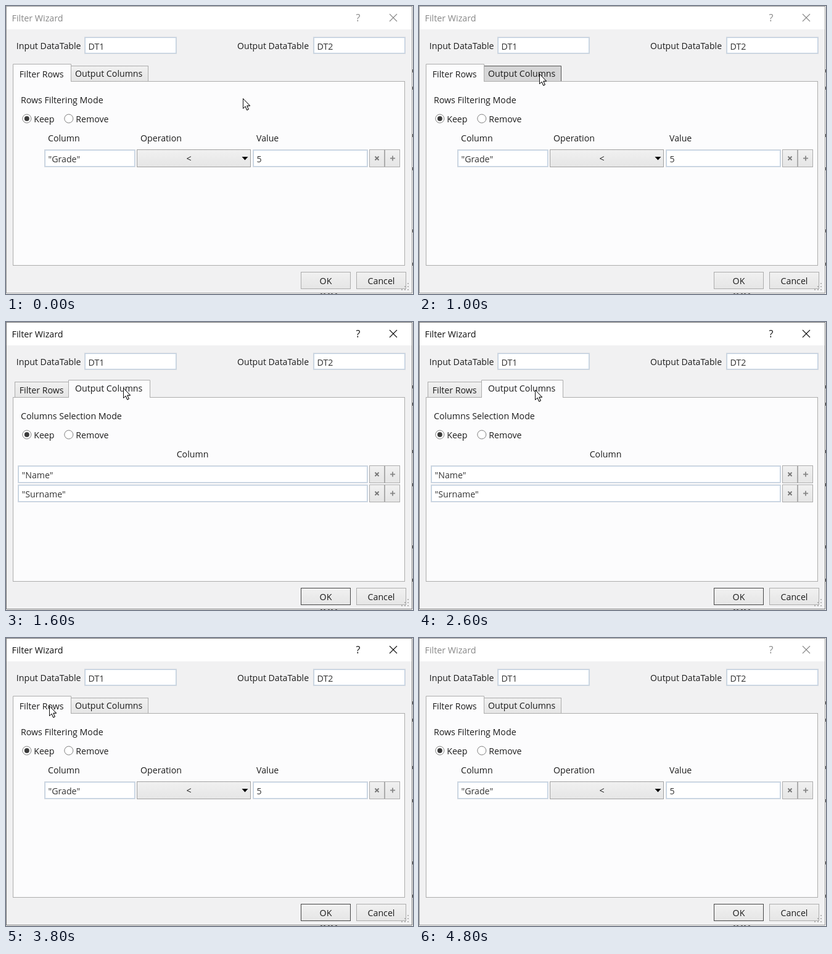
Write an HTML page with a canvas that moves like this. It is 660 by 468 pixels and loops after 5 s.

```html
<!DOCTYPE html>
<html lang="en">
<head>
<meta charset="utf-8">
<title>Filter Wizard</title>
<style>
html, body { margin: 0; width: 660px; height: 468px; overflow: hidden; background: #fff; }
canvas { display: block; }
</style>
</head>
<body>
<canvas id="stage" width="660" height="468"></canvas>
<script>
const ctx = document.getElementById('stage').getContext('2d');
const LOOP = 5000;
const INK = '#1c1c1c', LINE = '#acacac', DARK = '#464646';

// Pointer track: start time, x, y; the pointer jumps between samples.
const track = [
  [0, 384, 150], [400, 333, 142], [600, 250, 135], [800, 208, 112],
  [1000, 195, 110], [1600, 190, 107], [2600, 188, 110], [2800, 134, 111],
  [3000, 78, 111], [3200, 70, 110], [4000, 75, 234], [4200, 66, 445]
];
const POINTER_GONE = 4400;

function fill(x, y, w, h, color) {
  ctx.fillStyle = color;
  ctx.fillRect(x, y, w, h);
}

function frame(x, y, w, h, color) {
  ctx.strokeStyle = color;
  ctx.lineWidth = 1;
  ctx.strokeRect(x + .5, y + .5, w - 1, h - 1);
}

function path(points, color, width = 1, close = false) {
  ctx.beginPath();
  points.forEach(([x, y], i) => i ? ctx.lineTo(x, y) : ctx.moveTo(x, y));
  if (close) ctx.closePath();
  ctx.strokeStyle = color;
  ctx.lineWidth = width;
  ctx.stroke();
}

function text(str, x, y, { color = INK, align = 'left', size = 14.2 } = {}) {
  ctx.font = `${size}px "Open Sans", "Noto Sans", sans-serif`;
  ctx.textAlign = align;
  ctx.fillStyle = color;
  ctx.fillText(str, x, y);
}

function raised(x, y, w, h, border = LINE) {
  const g = ctx.createLinearGradient(0, y, 0, y + h);
  g.addColorStop(0, '#f1f1f1');
  g.addColorStop(1, '#e5e5e5');
  fill(x, y, w, h, g);
  frame(x, y, w, h, border);
}

function field(x, y, w, h, str) {
  fill(x, y, w, h, '#fff');
  frame(x, y, w, h, '#d3d8df');
  frame(x + 1, y + 1, w - 2, h - 2, '#c3d3e4');
  text(str, x + 6.5, y + 20.5, { color: '#333' });
}

function radio(x, y, on, label) {
  ctx.beginPath();
  ctx.arc(x, y, 7, 0, Math.PI * 2);
  ctx.fillStyle = '#fff';
  ctx.fill();
  ctx.strokeStyle = '#808080';
  ctx.lineWidth = 1;
  ctx.stroke();
  if (on) {
    ctx.beginPath();
    ctx.arc(x, y, 4, 0, Math.PI * 2);
    ctx.fillStyle = '#3c3c3c';
    ctx.fill();
  }
  text(label, x + 11.4, 188.5);
}

function rowButtons(y) {
  raised(589, y, 25, 29);
  raised(614, y, 25, 29);
  const c = y + 14.5;
  path([[598.5, c - 3], [604.5, c + 3]], '#777', 1.8);
  path([[604.5, c - 3], [598.5, c + 3]], '#777', 1.8);
  path([[623, c], [631, c]], '#888', 1.8);
  path([[627, c - 4], [627, c + 4]], '#888', 1.8);
}

function openTab(x, w) {
  fill(x, 94, w, 29, '#fcfcfd');
  path([[x + .5, 123], [x + .5, 94.5], [x + w - .5, 94.5], [x + w - .5, 123]], LINE);
}

function closedTab(x, w, hot) {
  if (hot) {
    fill(x, 97, w, 25, '#d6d6d7');
    path([[x + .5, 122], [x + .5, 97.5], [x + w - .5, 97.5], [x + w - .5, 122]], '#555');
  } else {
    raised(x, 97, w, 26);
  }
}

function tabs(columns, hot) {
  if (columns) closedTab(14, 89, hot);
  else closedTab(105, 126, hot);
  fill(11, 122, 636, 300, '#fcfcfd');
  frame(11, 122, 636, 300, LINE);
  if (columns) openTab(101, 133);
  else openTab(11, 95);
  text('Filter Rows', 21.8, 115.5);
  text('Output Columns', 112, columns ? 112.5 : 115);
}

function rowsPage() {
  text('Rows Filtering Mode', 24, 158);
  text('Column', 68, 220);
  text('Operation', 218, 220);
  text('Value', 406, 220);
  field(62, 233, 148, 29, '"Grade"');
  raised(212, 233, 185, 29, '#a0a0a0');
  text('<', 296.5, 253, { align: 'center' });
  ctx.beginPath();
  ctx.moveTo(382.5, 245);
  ctx.lineTo(392.5, 245);
  ctx.lineTo(387.5, 250.5);
  ctx.fillStyle = '#000';
  ctx.fill();
  field(400, 233, 187, 29, '5');
  rowButtons(233);
}

function columnsPage() {
  text('Columns Selection Mode', 24, 158);
  text('Column', 302.5, 220, { align: 'center' });
  ['"Name"', '"Surname"'].forEach((str, i) => {
    field(19, 233 + 31 * i, 568, 29, str);
    rowButtons(233 + 31 * i);
  });
}

function backdrop() {
  fill(0, 0, 660, 468, '#fdfdfd');
  for (const y of [103, 131, 208, 262, 363, 417]) fill(658, y, 2, 5, '#555');
  for (const x of [510, 515, 522, 527, 534]) fill(x, 467, 3, 1, '#777');
}

function shell(active, okDark) {
  fill(0, 0, 659, 467, '#f1f1f2');
  fill(0, 0, 659, 38, '#fff');
  frame(0, 0, 659, 467, active ? '#777' : '#999');
  const color = active ? '#111' : '#888';
  text('Filter Wizard', 9.6, 25, { color, size: 14.3 });
  text('?', 571, 25, { color, align: 'center', size: 16 });
  path([[622, 13], [634, 25]], color, 1.1);
  path([[634, 13], [622, 25]], color, 1.1);

  text('Input DataTable', 16.8, 70);
  field(127, 50, 150, 28, 'DT1');
  text('Output DataTable', 375, 70, { size: 14.1 });
  field(498, 50, 150, 28, 'DT2');

  raised(478, 432, 81, 28, okDark ? DARK : LINE);
  raised(568, 432, 81, 28);
  text('OK', 518.5, 452, { align: 'center' });
  text('Cancel', 608.5, 452, { align: 'center' });

  for (let row = 0; row < 3; row++)
    for (let col = 0; col <= row; col++)
      fill(651 - col * 5, 450 + row * 5, 2, 2, '#b4b4b4');
}

function pointer(x, y) {
  ctx.save();
  ctx.translate(x + .5, y + .5);
  ctx.lineJoin = 'miter';
  ctx.fillStyle = '#fff';
  path([[0, 0], [0, 16], [3.6, 12.6], [6.2, 18.6], [8.8, 17.5], [6.2, 11.6], [11, 11.6]], '#111', 1, true);
  ctx.fill();
  ctx.stroke();
  ctx.restore();
}

function draw(t) {
  const columns = t >= 1600 && t < 3800;
  const active = t >= 1400 && t < 4800;
  const hot = (t >= 800 && t < 1600) || (t >= 3000 && t < 3800);
  backdrop();
  shell(active, t >= 1600);
  tabs(columns, hot);
  radio(33.8, 183, true, 'Keep');
  radio(101.8, 183, false, 'Remove');
  (columns ? columnsPage : rowsPage)();
  if (t < POINTER_GONE) {
    const [, x, y] = track.filter(p => p[0] <= t).pop();
    pointer(x, y);
  }
}

const start = performance.now();
function tick() {
  draw((performance.now() - start) % LOOP);
  requestAnimationFrame(tick);
}
tick();
</script>
</body>
</html>
```
